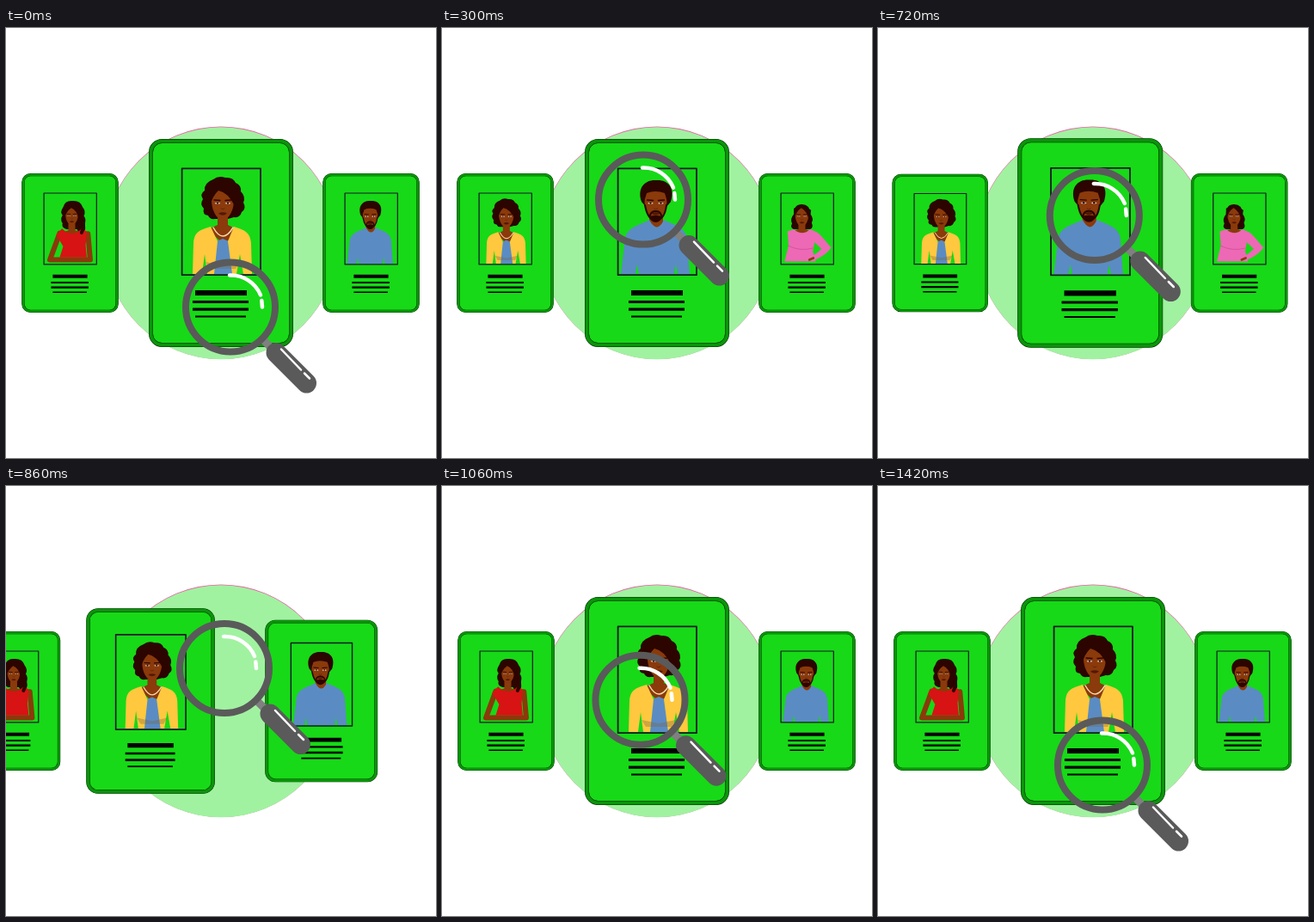
Animation, 500 px wide and 500 px high, one loop 1440 ms. Source, as an HTML page with a canvas:

```html
<!DOCTYPE html>
<html lang="en">
<head>
<meta charset="utf-8">
<title>Choosing a candidate</title>
<style>
html, body { margin: 0; width: 100%; height: 100%; overflow: hidden; background: #fff }
canvas { display: block; width: 500px; height: 500px }
</style>
</head>
<body>
<canvas id="stage" width="500" height="500"></canvas>
<script>
const ctx = document.getElementById('stage').getContext('2d');
const LOOP = 1440, STEP = 20, SMALL = 0.67;
const SKIN = '#8a3a0b', HAIR = '#2c0500', LIPS = '#541706';

function fill(color, path) {
  ctx.fillStyle = color;
  ctx.fill(new Path2D(path));
}

function line(color, width, path, cap = 'round') {
  ctx.strokeStyle = color;
  ctx.lineWidth = width;
  ctx.lineCap = cap;
  ctx.lineJoin = 'round';
  ctx.stroke(new Path2D(path));
}

function disc(color, x, y, r) {
  ctx.fillStyle = color;
  ctx.beginPath();
  ctx.arc(x, y, r, 0, 7);
  ctx.fill();
}

// Head centred on the eye line
function face(x, y, size = 1) {
  ctx.save();
  ctx.translate(x, y);
  ctx.scale(size, size);
  fill(SKIN, 'M-13-3C-13-21 13-21 13-3C13 9 7 20 0 20S-13 9-13-3Z');
  line(HAIR, 1.3, 'M-10-3L-3-2.5M3-2.5L10-3');
  for (const eye of [-6, 6]) {
    fill('#f3ddd0', `M${eye - 3.5} 1Q${eye}-1.5 ${eye + 3.5} 1Q${eye} 2.5 ${eye - 3.5} 1Z`);
    disc(HAIR, eye, 0.6, 1.2);
  }
  line('#66270a', 1, 'M-2 7Q0 9 2 7');
  fill(LIPS, 'M-5 12.5Q0 10 5 12.5Q0 17-5 12.5Z');
  ctx.restore();
}

function yellowWoman() {
  fill(HAIR, 'M-9-74Q-3-79 5-76Q14-77 17-70Q24-67 23-60Q29-54 26-47Q30-40 24-36Q22-29 15-30L8-28H-7Q-13-27-15-32Q-22-33-20-40Q-25-45-21-51Q-25-57-19-61Q-20-70-9-74Z');
  fill(SKIN, 'M-4-32H8V-21L18-16 4 3-15-16-4-21Z');
  face(2, -47);
  fill(HAIR, 'M-13-42Q-10-55-3-61Q8-59 16-43L20-60 2-73-17-62Z');
  fill('#5a8cc3', 'M-5-2L-8 36H14L9-2 2-5Z');
  fill('#ffc83e', 'M-12-19C-26-15-31-12-32 0L-33 36H-22L-19 13-16 36H-8L-4-2ZM15-19C28-15 34-12 35 0L36 36H26L22 13 18 36H13L8-2Z');
  fill('rgba(120,100,70,.35)', 'M-18 22L2 26 22 22 17 30H-13Z');
  line('#f6d9a8', 1.5, 'M-9-18Q2 2 14-18');
}

function man() {
  fill(HAIR, 'M-18-48C-24-66-12-74-1-73C11-74 22-66 16-48L11-42H-13Z');
  fill(SKIN, 'M-9-33H7V-20Q-1-12-9-20Z');
  face(-1.5, -47);
  fill(HAIR, 'M-15-48L-12-58Q-2-62 9-58L12-48 15-60 4-71-14-68Z');
  line(HAIR, 2, 'M-14-44Q-11-27-1.5-26Q9-27 11-44M-8-32Q-7-37-1.5-37Q4-37 5-32');
  fill(HAIR, 'M-9-31Q-1.5-33 6-31Q4-24-1.5-24T-9-31Z');
  fill('#5a8cc3', 'M-9-27C-16-22-34-20-37-6L-42 36H-25L-23 25-21 36H20L22 25 24 36H38L35-5C33-20 16-22 8-27Q0-10-9-27Z');
}

function redWoman() {
  fill(HAIR, 'M-13-48Q-18-54-12-62Q-9-74 4-73Q18-74 22-62Q28-55 24-47Q29-40 25-33Q29-24 22-17L16-16 12-24H-6Q-16-27-13-34Q-18-41-13-48Z');
  fill(SKIN, 'M-3-34H9V-22L24-18Q5 0-14-18L-3-22Z');
  face(3, -48, 0.85);
  fill(HAIR, 'M-11-40Q-7-55 2-61Q12-57 15-42L21-58 4-71-12-62Z');
  line(SKIN, 9, 'M-18-17L-35 29H35L31-16');
  fill('#d71313', 'M-14-25Q4-8 20-25L29-20 27 4 29 25H-18L-12 6-24-14Z');
  line(HAIR, 6, 'M22-38Q25-28 20-18');
}

function pinkWoman() {
  fill(HAIR, 'M-23-50Q-23-67-9-67Q5-67 6-50Q12-42 8-35Q12-26 5-24H-23Q-30-26-26-34Q-30-42-23-50Z');
  fill(SKIN, 'M-15-34H-3V-24L6-21Q-8-8-24-21L-15-24Z');
  face(-9, -47, 0.9);
  fill(HAIR, 'M-23-38Q-20-55-10-61Q0-56 4-38L7-57-9-66-23-60Z');
  fill('#ed69b5', 'M-34-20L-23-24Q-8-11 5-24L14-20C24-16 34 0 42 8C34 20 22 26 8 32L3 25C14 21 20 15 25 10L13-1 10 14 15 32H-39L-32 4Z');
  line('#c9478f', 1, 'M-32 5Q-12 15 10 9');
  line(SKIN, 4, 'M4 29L11 26');
}

function card(x, scale, portrait) {
  ctx.save();
  ctx.translate(x, 250);
  ctx.scale(scale, scale);
  ctx.beginPath();
  ctx.roundRect(-81.5, -118.5, 163, 237, 13);
  ctx.fillStyle = '#17d917';
  ctx.fill();
  for (const [color, width] of [['#002800', 5], ['#0b940b', 4]]) {
    ctx.strokeStyle = color;
    ctx.lineWidth = width;
    ctx.stroke();
  }
  portrait();
  line('#181828', 1.8, 'M-45.4-86.6H46V37.2H-45.4Z');
  fill('#000', 'M-30 55H30V61H-30ZM-33 67H32V70H-33ZM-33 75.5H32V78.7H-33ZM-30 84.5H29V86.5H-30Z');
  ctx.restore();
}

function magnifier(x, y) {
  ctx.save();
  ctx.translate(x, y);
  line('#808080', 9, 'M38 38L50 50', 'butt');
  line('#5a5a5a', 23, 'M53 53L88.5 88.5');
  line('#fff', 2.5, 'M59 49L82 73M86 77L92 83');
  line('#5a5a5a', 8, 'M52 0A52 52 0 1 1-52 0A52 52 0 1 1 52 0Z');
  line('#fff', 4.5, 'M-1-37A37 37 0 0 1 35-14M36.3-7.5L37 0');
  ctx.restore();
}

// Eases in and out, overshooting by a tenth at both ends
function backInOut(x) {
  const c = 2.5949, a = 2 * x, b = a - 2;
  return x < 0.5
    ? a * a * ((c + 1) * a - c) / 2
    : (b * b * ((c + 1) * b + c) + 2) / 2;
}

const clamp = x => Math.min(1, Math.max(0, x));
const slide = t => backInOut(clamp(t / 300)) - backInOut(clamp((t - 700) / 300));

// Lens centre: time, x, y
const lensKeys = [
  [0, 261, 324.5], [160, 310.7, 190.5], [300, 234, 199.6], [540, 243, 229],
  [860, 254, 212], [1060, 230.5, 248.7], [1420, 261, 324.5]
];

function lensAt(t, axis) {
  const last = lensKeys.length - 1;
  if (t >= lensKeys[last][0]) return lensKeys[last][axis];
  const i = lensKeys.findIndex(key => key[0] > t) - 1;
  const from = lensKeys[i], to = lensKeys[i + 1];
  const velocity = k => k === 0 || k === last ? 0
    : (lensKeys[k + 1][axis] - lensKeys[k - 1][axis]) / (lensKeys[k + 1][0] - lensKeys[k - 1][0]);
  const span = to[0] - from[0], p = (t - from[0]) / span, q = 1 - p;
  return from[axis] * q * q * (1 + 2 * p) + to[axis] * p * p * (1 + 2 * q)
    + span * p * q * (velocity(i) * q - velocity(i + 1) * p);
}

function draw(now) {
  const t = Math.floor(now % LOOP / STEP) * STEP;
  const u = slide(t);
  ctx.fillStyle = '#fff';
  ctx.fillRect(0, 0, 500, 500);
  disc('#ec5fa6', 250, 249.8, 135.3);
  disc('#a0f2a0', 250, 250.3, 135);
  card(74.5 - 204 * u, SMALL, redWoman);
  card(655.5 - 231 * u, SMALL, pinkWoman);
  card(250 - 282.5 * u + 106 * u * u, 1 - (1 - SMALL) * u, yellowWoman);
  card(424.5 - 174.5 * u, SMALL + (1 - SMALL) * u, man);
  magnifier(lensAt(t, 1), lensAt(t, 2));
}

const start = performance.now();
function tick() {
  draw(performance.now() - start);
  requestAnimationFrame(tick);
}
tick();
</script>
</body>
</html>
```
